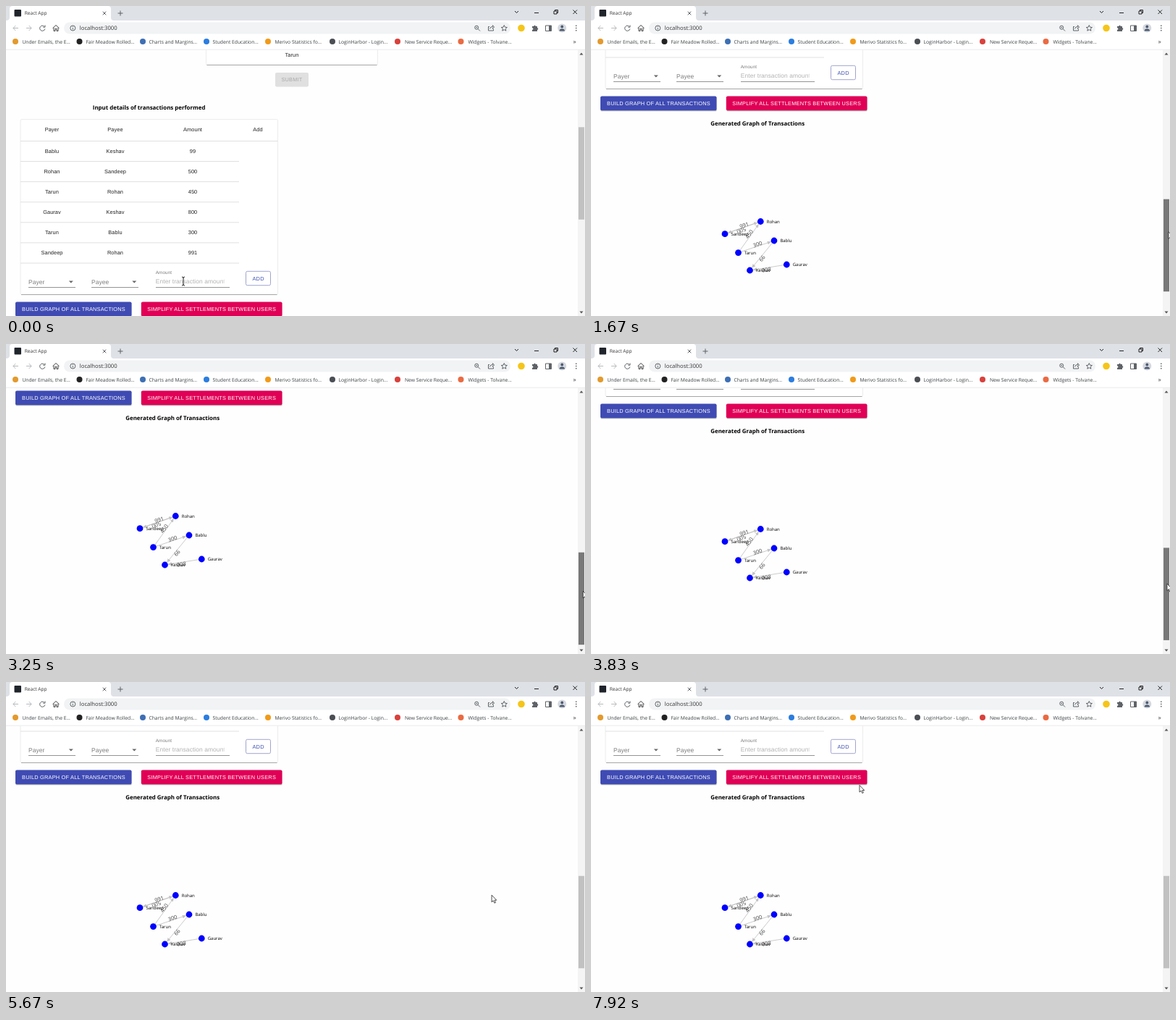
An HTML page that plays this animation: 800 px wide and 428 px high, repeating every 8000 ms.

```html
<!DOCTYPE html>
<html lang="en">
<head>
<meta charset="utf-8">
<title>Transaction graph</title>
<style>
  html, body { margin: 0; width: 100%; height: 100%; overflow: hidden; background: #fff; }
  svg { display: block; width: 100vw; height: 100vh; text-rendering: geometricPrecision; }
  .ui { font-family: "Open Sans", "Noto Sans", sans-serif; }
  .form { font: 7.38px "Liberation Sans", Arial, sans-serif; letter-spacing: .08px; fill: #222; }
  .title { font-weight: 700; font-size: 7.9px; fill: #000; }
  .button { letter-spacing: .21px; }
  .hint { font-size: 8.44px; fill: #7c7c7c; }
  .mid { text-anchor: middle; }
  .line { fill: none; stroke: #5f6368; stroke-width: 1; }
  .card { fill: #fff; stroke: #ececec; }
  .edge { fill: none; stroke: #a6a6a6; stroke-width: 1.2; }
</style>
</head>
<body>
<svg viewBox="0 0 800 428">
  <defs>
    <marker id="tip" viewBox="0 0 10 10" refX="10" refY="5" markerWidth="5" markerHeight="5" markerUnits="userSpaceOnUse" orient="auto">
      <path d="M0 0L10 5L0 10Z" fill="#c4c4c4"/>
    </marker>
    <clipPath id="field"><rect x="205" y="370" width="96.5" height="20"/></clipPath>
  </defs>
  <rect width="800" height="428" fill="#fefefe"/>

  <g id="page">
    <rect class="card" x="276.5" y="20.5" width="237" height="61" rx="2"/>
    <path class="edge" d="M277.5 81.5H512.5"/>
    <text class="form mid" x="395" y="70">Tarun</text>
    <rect x="372" y="92" width="46" height="19.5" rx="2" fill="#e0e0e0"/>
    <text class="form button mid" x="395" y="104.4" style="fill:#a8a8a8">SUBMIT</text>
    <text class="ui title" x="119.8" y="143">Input details of transactions performed</text>

    <rect class="card" x="20" y="156.5" width="355.5" height="242" rx="2"/>
    <path class="edge" d="M21 398.5H374.5"/>
    <g id="table" class="form mid"></g>
    <g class="form hint">
      <text x="31" y="384">Payer</text>
      <text x="118" y="384">Payee</text>
      <text x="206.8" y="370" style="font-size:6.33px">Amount</text>
      <text x="206.8" y="383.3" clip-path="url(#field)" style="fill:#b2b2b2">Enter transaction amount</text>
      <path d="M86.8 379.6h6l-3 3zM174.3 379.6h6l-3 3z" fill="#666"/>
    </g>
    <path d="M31 388.5h65M118 388.5h65M207 388.5h102" stroke="#949494"/>
    <rect x="331.5" y="366.3" width="34" height="19.4" rx="2" fill="#fff" stroke="#9fa5cf"/>
    <text class="form button mid" x="348.6" y="378.8" style="fill:#3f51b5">ADD</text>

    <path d="M14 410H173V428.8H14zM188 410H381V428.8H188z" fill="#b4b4b4" stroke="#b4b4b4" stroke-linejoin="round"/>
    <rect id="build" x="13" y="408.5" width="160.5" height="19.7" rx="2" fill="#3f4bb3"/>
    <rect x="186.8" y="408.5" width="194.7" height="19.7" rx="2" fill="#e00056"/>
    <g class="form button mid" style="fill:#fff">
      <text x="93.5" y="421">BUILD GRAPH OF ALL TRANSACTIONS</text>
      <text x="284.2" y="421">SIMPLIFY ALL SETTLEMENTS BETWEEN USERS</text>
    </g>
    <text class="ui title" x="165.3" y="448.8">Generated Graph of Transactions</text>
    <g id="graph" class="ui"></g>
  </g>

  <g id="scrollbar">
    <rect x="790" y="60" width="10" height="368" fill="#f4f4f4"/>
    <path d="M792.5 67.5h5l-2.5-3z" fill="#555"/>
    <path id="down" d="M792.5 421.5h5l-2.5 3z"/>
    <rect id="thumb" x="791" width="8" height="127.5"/>
  </g>

  <g id="browser" class="ui">
    <rect width="800" height="60.5" fill="#fff"/>
    <path d="M0 0H800V20H149Q145 20 145 16V4Q145 0 141 0H9Q5 0 5 4V16Q5 20 0 20Z" fill="#dee1e6"/>
    <rect x="11.5" y="5" width="9.5" height="9.5" rx="1" fill="#20252c"/>
    <text x="25.7" y="12.4" font-size="6.6" fill="#333">React App</text>
    <path class="line" d="M133.7 7.7l4.6 4.6m0-4.6l-4.6 4.6M154.5 10h7M158 6.5v7"/>
    <path class="line" style="stroke:#222" d="M703 7l2.5 2.5 2.5-2.5M730 9.5h6M757 7h4v4h-4zM758.5 7V5.5H762.5V9.5H761M783.5 5.5l5.5 5.5m0-5.5l-5.5 5.5"/>

    <rect x="80" y="22.5" width="617" height="16" rx="8" fill="#f1f3f4"/>
    <path class="line" style="stroke:#b8babd" d="M17 30.5h-7m3.3-3.5l-3.4 3.5 3.4 3.5M28 30.5h7m-3.3-3.5l3.4 3.5-3.4 3.5"/>
    <path class="line" d="M53 28.4A3.6 3.6 0 1 0 53.8 31.5M54 26.5v2.7h-2.8"/>
    <path class="line" style="stroke:#444" d="M64.5 30.7l4.5-4.2 4.5 4.2M66 30v4.5h2v-3h2v3h2V30"/>
    <circle class="line" cx="92.3" cy="30.5" r="3.5"/>
    <path class="line" d="M92.3 30v2.5M92.3 28.2v.9"/>
    <text x="101.8" y="33.3" font-size="7.7" fill="#333">localhost:3000</text>
    <circle class="line" cx="650.2" cy="29.7" r="2.5"/>
    <path class="line" d="M652 31.5l3 3M649 29.7h2.4"/>
    <path class="line" d="M668 28.5h-1.5V34h7v-2M668.5 31.5q.3-3 4-3v-1.8l2 2.4-2 2.4v-1.7"/>
    <path class="line" d="M688.3 26.5l1.2 2.7 2.9.3-2.2 1.9.7 2.8-2.6-1.5-2.5 1.5.6-2.8-2.1-1.9 2.8-.3z"/>
    <circle cx="712" cy="30.5" r="4.8" fill="#f5c518"/>
    <path d="M727 28h2.2a1.3 1.3 0 1 1 2.6 0H734v2.3a1.3 1.3 0 1 1 0 2.6V35h-7v-2a1.4 1.4 0 1 0 0-2.8z" fill="#5f6368"/>
    <path d="M745.5 27h8v7.5h-8z" class="line"/>
    <path d="M750 27h3.5v7.5H750z" fill="#5f6368"/>
    <circle cx="768.3" cy="30.5" r="6" fill="#d5d9df"/>
    <path d="M768.3 26.6a1.9 1.9 0 1 1-.01 0M764.6 34.4q0-3 3.7-3t3.7 3z" fill="#4c5a70"/>
    <path d="M787 26.6h1.5v1.5H787zM787 29.8h1.5v1.5H787zM787 33h1.5v1.5H787z" fill="#5f6368"/>
    <g id="bookmarks" font-size="6.75" fill="#3c4043"></g>
    <text x="783.5" y="52" font-size="8.5" fill="#444">»</text>
    <path d="M0 60.2H800" stroke="#e2e4e7" stroke-width=".7"/>
  </g>

  <path id="beam" d="M-2-6Q0-6 0-4.5Q0-6 2-6M0-5V5M-2 6Q0 6 0 4.5Q0 6 2 6" fill="none" stroke="#222"/>
  <path id="arrow" d="M0 0V9.6L2.2 7.6 3.8 11 5.4 10.3 3.9 7H6.7Z" fill="#fff" stroke="#222" stroke-width=".8"/>
</svg>

<script>
const LOOP = 8000, FRAME = 1000 / 12, MAX_SCROLL = 354;
const $ = id => document.getElementById(id);
const text = (x, y, content, extra = '') => `<text x="${x}" y="${y}" ${extra}>${content}</text>`;

const payments = [
  ['Bablu', 'Keshav', 99], ['Rohan', 'Sandeep', 500], ['Tarun', 'Rohan', 450],
  ['Gaurav', 'Keshav', 800], ['Tarun', 'Bablu', 300], ['Sandeep', 'Rohan', 991]
];
const people = {
  Rohan: [234.3, 581.5], Sandeep: [185, 598.7], Bablu: [253, 608],
  Tarun: [203.5, 624.6], Keshav: [219.5, 649], Gaurav: [270.3, 641]
};
const bookmarks = [
  [13, 22.4, 'Under Emails, the E...', '#e39a2d'], [101.5, 110.4, 'Fair Meadow Rolled...', '#222'],
  [189, 197.4, 'Charts and Margins...', '#3d6fb4'], [277, 285.6, 'Student Education...', '#2b7de0'],
  [362, 371.4, 'Merivo Statistics fo...', '#f09a1a'], [451, 459.4, 'LoginHarbor - Login...', '#4b4f54'],
  [541, 551, 'New Service Reque...', '#d8413c'], [628.5, 638.4, 'Widgets - Tolvane...', '#ea6a42']
];

function tableMarkup() {
  const columns = [63.5, 151, 258, 348];
  const row = (cells, y) => cells.map((cell, i) => text(columns[i], y, cell)).join('');
  const rule = (y, end) => `<path d="M20 ${y}H${end}" stroke="#e0e0e0"/>`;
  return row(['Payer', 'Payee', 'Amount', 'Add'], 173.3) + rule(186.5, 375.5) +
    payments.map((cells, i) => row(cells, 202.8 + 28.1 * i) + rule(214.5 + 28.1 * i, 322)).join('');
}

function graphMarkup() {
  const edges = payments.map(([from, to, amount]) => {
    const [x1, y1] = people[from], [x2, y2] = people[to];
    const dx = x2 - x1, dy = y2 - y1, length = Math.hypot(dx, dy);
    const angle = Math.atan2(dy, dx) * 180 / Math.PI;
    return `<g transform="translate(${x1} ${y1}) rotate(${angle})">
      <path d="M0 0H${length - 4.5}" stroke="#bbb" stroke-width=".7" marker-end="url(#tip)"/>
      ${text(length / 2 + 3, 0, amount, 'class="mid" font-size="7.5" fill="#444"')}</g>`;
  });
  const nodes = Object.entries(people).map(([name, [x, y]]) =>
    `<circle cx="${x}" cy="${y}" r="4.4" fill="#00f"/>` + text(x + 8.4, y + 2.2, name, 'font-size="6"'));
  return edges.join('') + nodes.join('');
}

$('table').innerHTML = tableMarkup();
$('graph').innerHTML = graphMarkup();
$('bookmarks').innerHTML = bookmarks.map(([cx, x, label, color]) =>
  `<circle cx="${cx}" cy="49" r="4" fill="${color}"/>` + text(x, 51.5, label)).join('');

// Keyframes: [time, value, ...]
const scrollKeys = [
  [830, 0], [1080, 97], [1750, 310], [2000, 354], [2900, 354], [3400, 340],
  [3830, 326], [4200, 300], [4750, 297], [5080, 292], [5300, 287]
];
const pointerKeys = [
  [80, 245, 380], [330, 120, 414], [450, 120, 414], [800, 798, 221], [1080, 798, 255],
  [2000, 798, 344], [2900, 798, 344], [3400, 797, 340], [3830, 796, 331], [4200, 792, 322],
  [4750, 791, 320], [5300, 791, 316], [5670, 670, 294], [6000, 640, 280], [7500, 371, 142.5]
];

function sample(keys, time) {
  const next = keys.findIndex(key => key[0] > time);
  if (next === 0) return keys[0].slice(1);
  if (next < 0) return keys[keys.length - 1].slice(1);
  const a = keys[next - 1], b = keys[next], k = (time - a[0]) / (b[0] - a[0]);
  return a.slice(1).map((value, i) => value + (b[i + 1] - value) * k);
}

function draw(now) {
  const time = Math.floor((now % LOOP + 4) / FRAME) * FRAME;
  const scroll = Math.round(sample(scrollKeys, time)[0]);
  const [x, y] = sample(pointerKeys, time);
  const overField = time < 160;
  const overBuild = x > 13 && x < 173 && y > 408;

  $('page').setAttribute('transform', `translate(0 ${-scroll})`);
  $('thumb').setAttribute('y', 167.3 + scroll * 0.35);
  $('thumb').setAttribute('fill', time > 800 && time < 5310 ? '#787878' : '#c1c1c1');
  $('down').setAttribute('fill', scroll >= MAX_SCROLL ? '#bbb' : '#555');
  $('build').setAttribute('fill', overBuild ? '#303f9f' : '#3f4bb3');
  for (const id of ['beam', 'arrow']) $(id).setAttribute('transform', `translate(${x} ${y})`);
  $('beam').style.display = overField ? '' : 'none';
  $('arrow').style.display = overField ? 'none' : '';
}

function tick() {
  draw(performance.now());
  requestAnimationFrame(tick);
}
tick();
</script>
</body>
</html>
```
